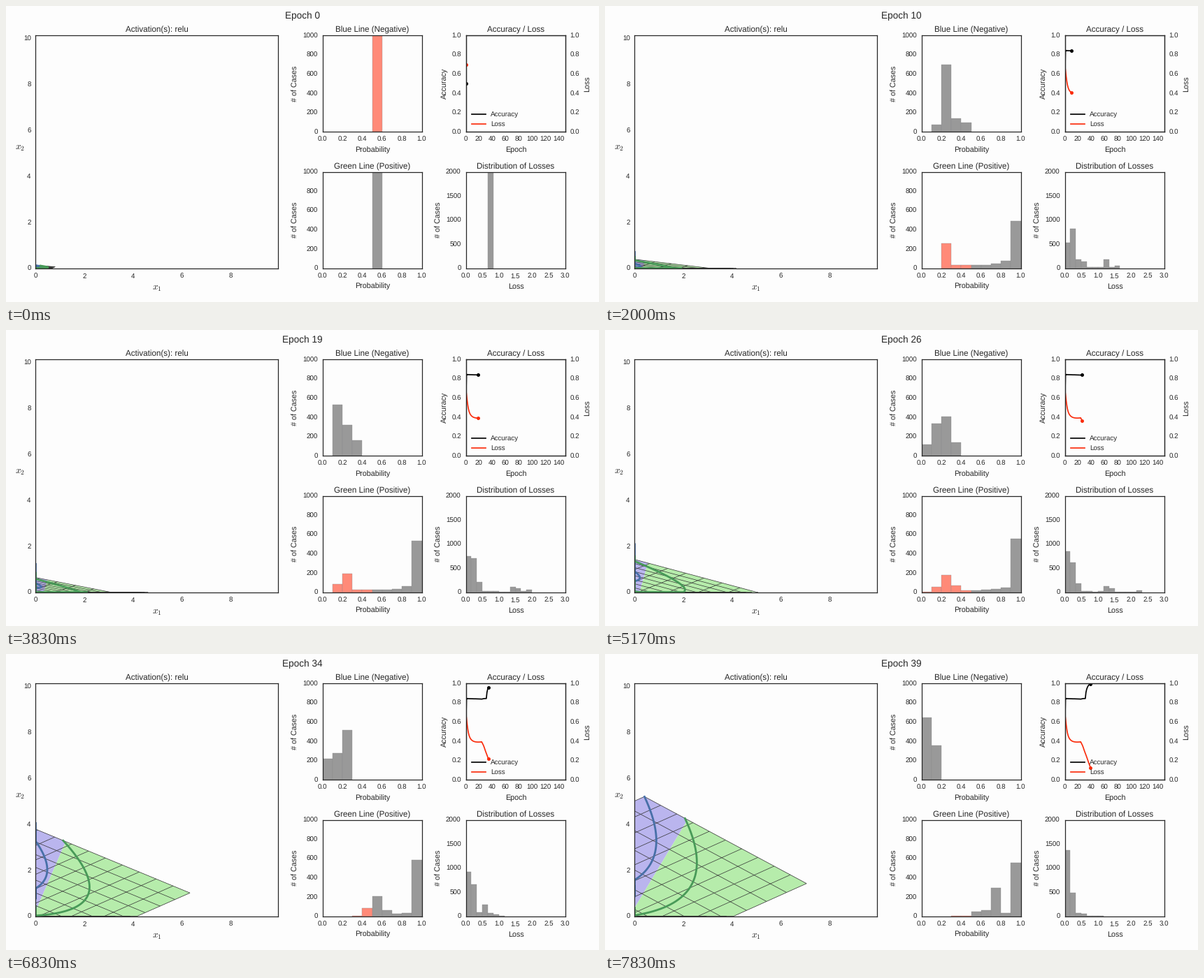
Recreate the animation shown at these times as a matplotlib script. Size 848x424 px, loop 8000 ms.

```python
import numpy as np
import matplotlib.pyplot as plt
from matplotlib.animation import FuncAnimation
from matplotlib.collections import LineCollection
from matplotlib.patches import Polygon

W, H, DPI = 848, 424, 80
FRAMES, LOOP = 48, 8000
PT = 72 / DPI                      # points per pixel
INK, PAPER = "#262626", "#fdfdfd"
GRAY, ROSE, RED = "#999999", "#ff8a78", "#fa2c0c"

plt.rcParams.update({
    "font.family": "Liberation Sans", "text.color": INK,
    "text.hinting": "none", "font.size": 9.72 * PT,
    "axes.edgecolor": INK, "axes.linewidth": 1.25 * PT,
    "xtick.color": INK, "ytick.color": INK,
})

fig = plt.figure(figsize=(W / DPI, H / DPI), dpi=DPI, facecolor=PAPER)


def panel(x0, y0, x1, y1, xlim, ylim, xticks, yticks):
    """Axes placed by pixel box, measured from the top left."""
    ax = fig.add_axes([x0 / W, 1 - y1 / H, (x1 - x0) / W, (y1 - y0) / H],
                      facecolor=PAPER)
    ax.set(xlim=(0, xlim), ylim=(0, ylim), xticks=xticks, yticks=yticks)
    ax.tick_params(length=0, pad=6.8 * PT)
    return ax


def label(x, y, text, size=10.7, **kw):
    kw = {"ha": "center", "va": "baseline", **kw}
    return fig.text(x / W, 1 - y / H, text, fontsize=size * PT, **kw)


def small_panel(x, y, title, xlabel, ylabel, *scales):
    """One of the four charts, with its title and axis labels."""
    label(x + 71, y - 4.3, title, 11.67)
    label(x + 71, y + 167.3, xlabel)
    label(x - 39 + 8 * (ylabel == "Accuracy"), y + 69, ylabel,
          rotation=90, va="center")
    return panel(x - .5, y, x + 141.5, y + 138, *scales)


tenths = np.arange(0, 1.1, .2)
cases = range(0, 1001, 200)
space = panel(42.4, 42, 389.4, 375.5, 9.95, 10.13,
              range(0, 9, 2), range(0, 11, 2))
blue_ax = small_panel(453, 42, "Blue Line (Negative)", "Probability",
                      "# of Cases", 1, 1000, tenths, cases)
green_ax = small_panel(453, 237.5, "Green Line (Positive)", "Probability",
                       "# of Cases", 1, 1000, tenths, cases)
score_ax = small_panel(658, 42, "Accuracy / Loss", "Epoch", "Accuracy",
                       150, 1, range(0, 141, 20), tenths)
dist_ax = small_panel(658, 237.5, "Distribution of Losses", "Loss",
                      "# of Cases", 3, 2000,
                      np.arange(0, 3.1, .5), range(0, 2001, 500))
loss_ax = score_ax.twinx()
loss_ax.set(ylim=(0, 1), yticks=tenths)
loss_ax.tick_params(length=0, pad=6.8 * PT)

label(831.5, 112, "Loss", rotation=90, va="center")
label(216, 37.7, "Activation(s): relu", 11.67)
label(216, 407, "$x_1$", 13.6, math_fontfamily="cm")
label(20.5, 206, "$x_2$", 13.6, math_fontfamily="cm")
title = label(424, 18.5, "", 13.6)

# Transformed plane
blue_fill = Polygon(np.zeros((3, 2)), fc="#bab5ee", ec="none", zorder=1)
green_fill = Polygon(np.zeros((3, 2)), fc="#b6ecab", ec="none", zorder=1)
space.add_patch(blue_fill)
space.add_patch(green_fill)
grid = LineCollection([], colors="#333333", linewidths=.7 * PT, zorder=2)
space.add_collection(grid)
blue_curve, = space.plot([], [], color="#4870a8", lw=2.8 * PT, zorder=2.2)
green_curve, = space.plot([], [], color="#489a58", lw=2.8 * PT, zorder=2.2)


def make_bars(ax, n, width, color):
    return ax.bar(np.arange(n) * width, np.zeros(n), width, align="edge",
                  color=color, edgecolor="#88888c", linewidth=.3)


blue_bars = make_bars(blue_ax, 10, .1, [GRAY] * 5 + [ROSE] * 5)
green_bars = make_bars(green_ax, 10, .1, [ROSE] * 5 + [GRAY] * 5)
dist_bars = make_bars(dist_ax, 18, 1 / 6, GRAY)


def make_trace(ax, y, color, text):
    """Growing curve with a dot at its end, and its entry in the key."""
    line, = ax.plot([], [], color=color, lw=1.7 * PT)
    dot, = ax.plot([], [], "o", color=color, ms=5 * PT, mew=0)
    fig.add_artist(plt.Line2D([665.5 / W, 685.5 / W], [1 - y / H] * 2,
                              color=color, lw=1.7 * PT))
    label(693, y + 3.4, text, 9.72, ha="left")
    return line, dot


acc_trace = make_trace(score_ax, 155, "black", "Accuracy")
loss_trace = make_trace(loss_ax, 169, RED, "Loss")

# The two classes: parallel parabolas across the unit square
V = (np.arange(1000) + .5) / 1000
BOW = .5 * (2 * V - 1) ** 2
BLUE, GREEN = (.5 - BOW, V), (.75 - BOW, V)


class Network:
    """Hidden layer and classifier as they stand after some epochs."""

    def __init__(self, epoch):
        early = 1 - np.exp(-epoch / 5)
        late = np.clip((epoch - 24) / 15, 0, 1) ** .9
        self.corner = np.array([-2.9 * early + 3.3 * late,
                                .12 + .058 * epoch + 2.82 * late])
        self.a = np.array([.8 + 6.8 * early - .95 * late,
                           -.06 - .078 * epoch - .68 * late ** 2])
        self.b = np.array([-.2 - 1.2 * early - 6.8 * late,
                           -.1 - .4 * early - 3.4 * late])
        self.weights = np.array([3.3 * early + 2 * late,
                                 -.9 * early - 2.1 * late ** 2])
        self.bias = .04 - 1.15 * early + 2.2 * late

    def affine(self, u, v):
        return self.corner + np.outer(u, self.a) + np.outer(v, self.b)

    def hidden(self, u, v):
        return np.maximum(self.affine(u, v), 0)

    def prob(self, curve):
        logit = self.hidden(*curve) @ self.weights + self.bias
        return 1 / (1 + np.exp(-logit))

    def losses(self):
        return -np.log(np.concatenate([1 - self.prob(BLUE),
                                       self.prob(GREEN)]))

    def accuracy(self):
        return (np.mean(self.prob(BLUE) < .5)
                + np.mean(self.prob(GREEN) >= .5)) / 2


def epoch_at(frame):
    """Five epochs pass in six frames; the fifth is held."""
    return frame - (frame + 1) // 6


NETS = [Network(e) for e in range(epoch_at(FRAMES - 1) + 1)]
ACC = [net.accuracy() for net in NETS]
LOSS = [net.losses().mean() for net in NETS]


def clip(poly, normal, limit):
    """Part of a convex polygon where normal . p >= limit."""
    out = []
    for i, p in enumerate(poly):
        prev = poly[i - 1]
        d0, d1 = np.dot(normal, prev) - limit, np.dot(normal, p) - limit
        if d0 * d1 < 0:
            out.append(prev + (p - prev) * d0 / (d0 - d1))
        if d1 >= 0:
            out.append(p)
    return out


def fill(patch, poly):
    patch.set_xy(np.array(poly) if len(poly) > 2 else np.zeros((3, 2)))


def draw_space(net):
    corners = list(net.affine([0, 1, 1, 0], [0, 0, 1, 1]))
    region = clip(clip(corners, (1, 0), 0), (0, 1), 0)
    fill(green_fill, clip(region, net.weights, -net.bias))
    fill(blue_fill, clip(region, -net.weights, net.bias))

    ramp = np.linspace(0, 1, 241)
    steps = np.linspace(0, 1, 11)
    grid.set_segments([net.hidden(s + 0 * ramp, ramp) for s in steps]
                      + [net.hidden(ramp, s + 0 * ramp) for s in steps])
    blue_curve.set_data(*net.hidden(*BLUE).T)
    green_curve.set_data(*net.hidden(*GREEN).T)


def draw_bars(bars, values, width):
    counts, _ = np.histogram(values, np.arange(len(bars) + 1) * width)
    for bar, n in zip(bars, counts):
        bar.set_height(n)
        bar.set_visible(n > 0)


def update(frame):
    epoch = epoch_at(frame)
    net = NETS[epoch]
    title.set_text(f"Epoch {epoch}")
    draw_space(net)
    draw_bars(blue_bars, net.prob(BLUE), .1)
    draw_bars(green_bars, net.prob(GREEN), .1)
    draw_bars(dist_bars, net.losses(), 1 / 6)
    for (line, dot), data in [(acc_trace, ACC), (loss_trace, LOSS)]:
        line.set_data(range(epoch + 1), data[:epoch + 1])
        dot.set_data([epoch], [data[epoch]])
    return []


anim = FuncAnimation(fig, update, frames=FRAMES, interval=LOOP / FRAMES,
                     init_func=lambda: update(0), repeat=True, repeat_delay=0)
plt.show()
```
